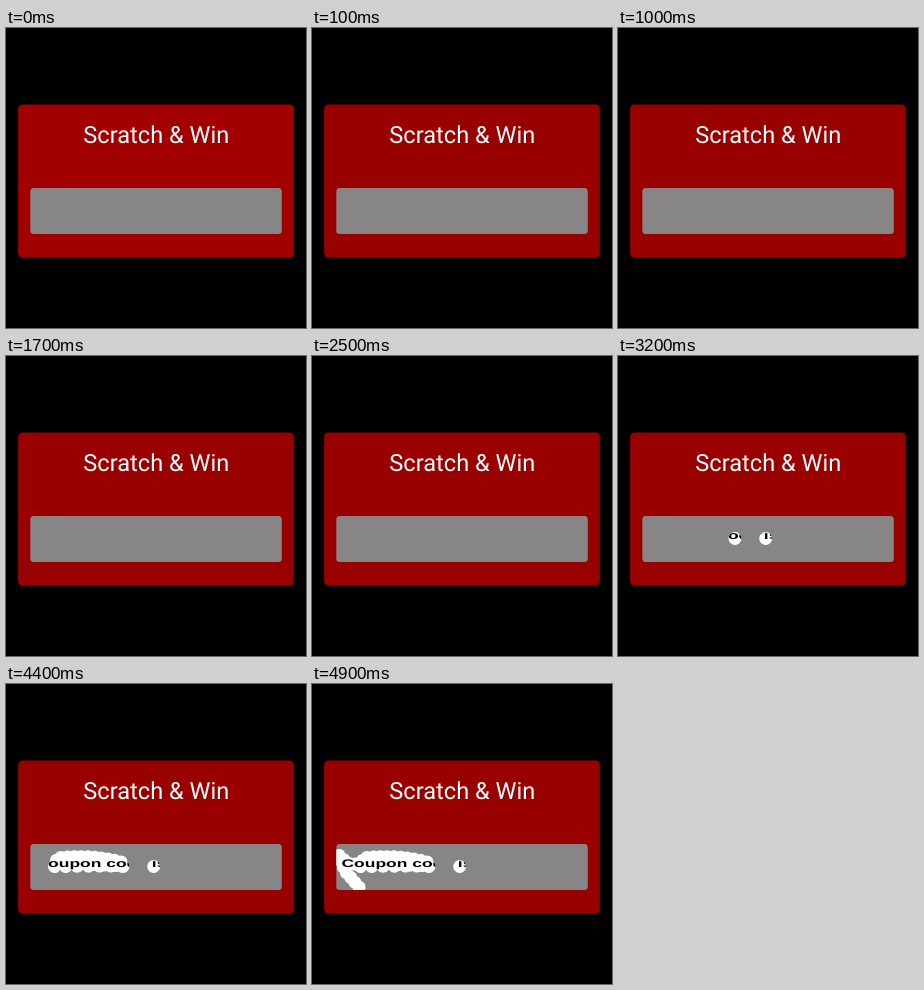
Recreate the animation shown at these times as an HTML page. Size 300 px wide and 300 px high, loop 5000 ms.

```html
<!DOCTYPE html>
<html lang="en">
<head>
<meta charset="utf-8">
<title>Scratch &amp; Win</title>
<style>
  html, body { margin: 0; width: 100%; height: 100%; overflow: hidden; background: #000; }
  svg { display: block; width: 100vw; height: 100vh; }
  text { text-rendering: geometricPrecision; }
  .title { font: 400 23.6px Roboto, Arial, sans-serif; fill: #fff; text-anchor: middle; }
  .prize { font: 700 11px "Liberation Sans", Arial, sans-serif; }
</style>
</head>
<body>
<svg viewBox="0 0 300 300">
  <defs>
    <clipPath id="panel"><rect x="24.3" y="160" width="251.5" height="46" rx="3.5"/></clipPath>
    <clipPath id="scratched"></clipPath>
  </defs>
  <rect id="card" x="12.1" y="76.5" width="275.8" height="153.1" rx="4.6"/>
  <text class="title" x="150.3" y="115.2">Scratch &amp; Win</text>
  <g clip-path="url(#panel)">
    <rect x="24" y="160" width="252" height="46" fill="#888587"/>
    <g clip-path="url(#scratched)">
      <rect x="24" y="160" width="252" height="46" fill="#fff"/>
      <!-- the prize line is set on a wide, flattened surface -->
      <text class="prize" transform="translate(29.5 183.3) scale(1.586 1)">Coupon code is</text>
    </g>
  </g>
</svg>
<script>
  const LOOP = 5000, STEP = 100, RADIUS = 6.5;
  const clip = document.getElementById('scratched');
  const card = document.getElementById('card');
  const dots = [];

  function svg(tag, attrs) {
    const el = document.createElementNS('http://www.w3.org/2000/svg', tag);
    for (const name in attrs) el.setAttribute(name, attrs[name]);
    return el;
  }

  // rubs evenly spaced round holes along a path between two times
  function rub(from, to, d, count) {
    const path = svg('path', { d });
    const length = path.getTotalLength();
    for (let i = 0; i < count; i++) {
      const part = i / (count - 1);
      const { x, y } = path.getPointAtLength(part * length);
      const el = svg('circle', { cx: x, cy: y, r: RADIUS });
      clip.append(el);
      dots.push({ el, time: from + Math.floor(part * (to - from) / STEP) * STEP });
    }
  }

  rub(3200, 3200, 'M147.7 182.5 H117', 2);
  rub(3300, 3500, 'M105 182 L48.5 182.5', 6);
  rub(3600, 3700, 'M50.5 176.5 L60 179.5 L110 181.5', 6);
  rub(3800, 4300, 'M55 173.5 Q90 170.5 115 178', 10);
  rub(4500, 4900, 'M43 180 L36.5 179.5 L27 171.5 L33 187 L47 203', 10);

  const origin = performance.now();

  function draw(now) {
    const t = Math.max(0, now - origin) % LOOP;
    card.setAttribute('fill', t < STEP ? '#a20000' : '#990000');
    for (const { el, time } of dots) el.style.display = t < time ? 'none' : 'inline';
    requestAnimationFrame(draw);
  }

  draw(origin);
</script>
</body>
</html>
```
